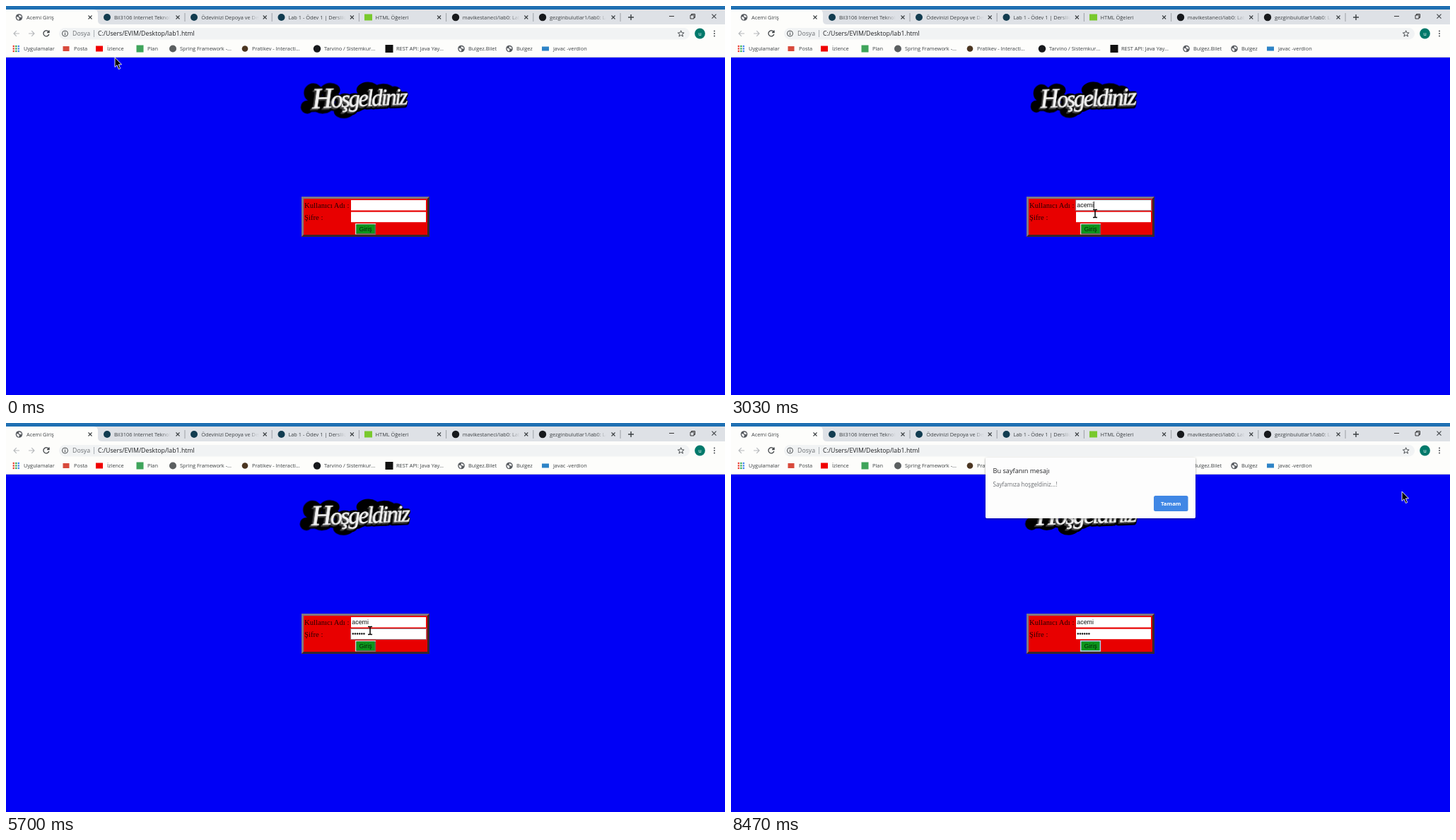
Recreate the animation shown at these times as an HTML page. Size 1017 px wide and 551 px high, loop 8500 ms.

```html
<!DOCTYPE html>
<html lang="tr">
<head>
<meta charset="utf-8">
<title>Giriş</title>
<style>
html, body { margin: 0; width: 100%; height: 100%; overflow: hidden; background: #0000f6; }
svg { display: block; }
body > svg, #wordart { position: absolute; left: 0; top: 0; }
#wordart { left: 411px; top: 96px; perspective: 600px; }
text { font-family: "Open Sans", sans-serif; font-size: 7.4px; fill: #3c4043; white-space: pre; }
.serif { font: 10.67px "Liberation Serif", serif; fill: #280000; }
.field { font: 8.9px "Liberation Sans", sans-serif; fill: #111; }
.art text { font: italic 34px "Liberation Serif", serif; letter-spacing: -2.4px; fill: inherit; }
.line { fill: none; stroke: #3c4043; stroke-width: 1.1; }
</style>
</head>
<body>
<svg id="page" width="1017" height="551"></svg>
<div id="wordart"></div>
<svg id="overlay" width="1017" height="551"></svg>
<script>
const LOOP = 8500;
const $ = id => document.getElementById(id);

const rect = (x, y, w, h, fill, more = '') =>
  `<rect x="${x}" y="${y}" width="${w}" height="${h}" fill="${fill}" ${more}/>`;
const dot = (x, y, r, fill) => `<circle cx="${x}" cy="${y}" r="${r}" fill="${fill}"/>`;
const label = (x, y, s, more = '') => `<text x="${x}" y="${y}" ${more}>${s}</text>`;
const line = (d, more = '') => `<path class="line" d="${d}" ${more}/>`;
const cross = (x, y, r) => line(`M${x - r} ${y - r}l${2 * r} ${2 * r}m0 ${-2 * r}l${-2 * r} ${2 * r}`);
const square = (x, y, fill, w = 10, h = w) => rect(x - w / 2, y - h / 2, w, h, fill);
const globe = (x, y) => dot(x, y, 4.8, '#55595e') +
  `<path d="M${x - 3.6} ${y - 1}l3 .8 1.2 2-1.4 2.2-2.2-2zM${x} ${y - 3.6}l3 1.4.6 2.4-2.4-.2-1.8-1.6z" fill="#f4f4f4"/>`;

function tab(x, title, icon, bg, end = 80) {
  return icon + `<svg x="${x}" y="5" width="${end}" height="21">${label(0, 14, title)}</svg>` +
    rect(x + end - 14, 8, 14, 16, `url(#fade)`, bg === 'active' ? 'opacity="0"' : '') +
    cross(x + 90, 16, 2.5);
}

function bookmarks() {
  const y = 60.5;
  const colors = ['#ea4335', '#36a853', '#4285f4', '#fbbc05'];
  let apps = '';
  for (let i = 0; i < 9; i++)
    apps += square(10.8 + i % 3 * 3.5, 57 + Math.floor(i / 3) * 3.5, colors[(i + Math.floor(i / 3)) % 4], 2.3);
  return apps + [
    [25, 'Uygulamalar', ''],
    [96, 'Posta', square(85, y, '#d84a3c', 9, 7)],
    [143, 'İzlence', square(132, y, '#f00000', 10, 8)],
    [200, 'Plan', square(189.5, y, '#3fa45b', 10)],
    [246, 'Spring Framework -...', dot(236, y, 5, '#5b5f60')],
    [348, 'Pratikev - Interacti...', dot(338, y, 4.3, '#4a3520')],
    [450, 'Tarvino / Sistemkur...', dot(440, y, 5.2, '#17191c')],
    [552, 'REST API: Java Yay...', square(542, y, '#111', 11)],
    [654, 'Bulgez.Bilet', globe(644, y)],
    [722, 'Bulgez', globe(712, y)],
    [774, 'javac -verdion', square(763, y, '#2d83c6', 10, 6)]
  ].map(([x, s, icon]) => icon + label(x, 63, s)).join('');
}

function browser() {
  const navy = '#123c50', ink = '#17191c';
  const tabs = [
    ['Bil3106 Internet Teknolojileri', dot(143, 16, 5, navy)],
    ['Ödevinizi Depoya ve Derslik', dot(266, 16, 5, navy)],
    ['Lab 1 - Ödev 1 | Derslikte', dot(389.5, 16, 5, navy)],
    ['HTML Öğeleri', square(512.5, 16, '#79c92d', 11, 9)],
    ['mavikestaneci/lab0: Lab çalışması', dot(636, 16, 5.2, ink)],
    ['gezginbulutlar1/lab0: Lab çalışması', dot(759, 16, 5.2, ink)]
  ];
  let s = `<defs><linearGradient id="fade"><stop stop-color="#dee1e6" stop-opacity="0"/>
    <stop offset="1" stop-color="#dee1e6"/></linearGradient></defs>`;
  s += rect(0, 0, 1017, 5.5, '#1f70b3') + rect(0, 5, 1017, 22, '#dee1e6') +
    rect(0, 26, 1017, 47, '#fdfdfb') +
    '<path d="M0 5H124Q130 5 130 11V21Q130 26 136 26H0Z" fill="#fdfdfb"/>';
  s += tab(29, 'Acemi Giriş', globe(18.5, 16), 'active');
  tabs.forEach(([title, icon], i) => {
    const x = 153 + i * 123.2;
    s += tab(x, title, icon) + line(`M${x + 100} 10v12`, 'style="stroke:#8d9196;stroke-width:.8"');
  });
  s += line('M880 16h8m-4-4v8', 'style="stroke-width:1.4"') +
    line('M938 14.5h7M968 13h5v5h-5zM969.5 13v-1.5h5v5H973', 'style="stroke:#222;stroke-width:.9"') +
    cross(1001.5, 14.7, 3);
  s += line('M19 39h-8m3.8-3.8L11 39l3.8 3.8M32 39h8m-3.8-3.8L40 39l-3.8 3.8', 'style="stroke:#b5b8bb"') +
    line('M60.5 37a4 4 0 1 0 .3 3M61 34.5v3h-3', 'style="stroke-width:1.3"');
  s += rect(75, 31, 892, 16.5, '#f1f3f4', 'rx="8.2"') +
    '<circle class="line" cx="83.5" cy="39" r="4" style="stroke-width:.9"/>' + line('M83.5 38.4v2.8M83.5 36.4v1') +
    label(94, 42.3, 'Dosya', 'style="font-size:8.75px;fill:#6b6f73"') +
    line('M124.5 34v10', 'style="stroke:#9aa0a6;stroke-width:.8"') +
    label(130, 42.3, 'C:/Users/EVIM/Desktop/lab1.html', 'style="font-size:8.75px;fill:#202124"') +
    line('M954.7 34.8l1.2 3 3.2.2-2.5 2 .9 3.1-2.8-1.8-2.8 1.8.9-3.1-2.5-2 3.2-.2z', 'style="stroke-width:.9"') +
    dot(981.5, 39, 7.4, '#00796b') +
    label(981.5, 41.5, 'u', 'text-anchor="middle" style="fill:#fff"') +
    [35.4, 39, 42.6].map(y => dot(1002, y, 1, '#4b4f53')).join('');
  return s + bookmarks() + rect(0, 72, 1017, 1, '#d5d7db');
}

function form() {
  return rect(418, 270, 181, 57, '#e80000') +
    '<path d="M418 327V270H599L596 273H421V324Z" fill="#81787f"/>' +
    '<path d="M599 270V327H418L421 324H596V273Z" fill="#36282d"/>' +
    label(422, 285.5, 'Kullanıcı Adı :', 'class="serif"') +
    label(422, 302.5, 'Şifre :', 'class="serif"') +
    rect(488, 275, 106, 14.5, '#fff') + rect(488, 291.7, 106, 14.5, '#fff') +
    '<rect id="ring" x="487.7" width="107" height="15" fill="none" stroke="#8a8f9c" stroke-width=".8"/>' +
    '<text id="user" class="field" x="489.3" y="285"/><g id="pass"></g>' +
    '<path id="caret" stroke="#000" stroke-width=".9"/>' +
    rect(494, 308, 29, 15.5, '#d9dfd9') + rect(495.3, 309.3, 27.7, 14.2, '#5c6a5c') +
    rect(495.5, 309.5, 26, 12.5, '#0c961c') +
    '<rect id="buttonRing" x="494.6" y="308.6" width="27.8" height="14.3" fill="none" stroke="#a9dcf5" stroke-width="1.3"/>' +
    label(508.5, 318.8, 'Giriş', 'class="field" text-anchor="middle" style="fill:#06240a"');
}

function wordart() {
  const word = '<tspan font-size="40">H</tspan>oşgeldiniz';
  const copy = (dx, dy, style) => `<text x="${21 + dx}" y="${46 + dy}" style="${style}">${word}</text>`;
  const puffs = [[14, 44, 9, 9], [23, 25, 13, 13], [47, 22, 14, 10], [36, 45, 14, 9], [66, 52, 15, 10],
    [82, 44, 16, 10], [102, 23, 17, 11], [125, 24, 17, 9], [143, 33, 12, 14], [115, 42, 20, 8]];
  let s = puffs.map(([x, y, rx, ry]) => `<ellipse cx="${x}" cy="${y}" rx="${rx}" ry="${ry}"/>`).join('');
  s += copy(-3, 1, 'stroke:#000;stroke-width:8;stroke-linejoin:round');
  for (let i = 4; i > 0; i--) {
    const shade = 165 - i * 22;
    s += copy(-i * .7, i * .6, `fill:rgb(${shade},${shade},${shade});stroke:#333;stroke-width:.6`);
  }
  s += copy(0, 0, 'fill:#f2f2f2;stroke:#e4e4e4;stroke-width:.7');
  return `<svg id="sign" class="art" width="180" height="70" overflow="visible"><g transform="rotate(-2 90 35)">${s}</g></svg>`;
}

function overlay() {
  return '<defs><filter id="shadow" x="-10%" y="-20%" width="120%" height="150%">' +
    '<feDropShadow dx="0" dy="1" stdDeviation="1.5" flood-opacity=".4"/></filter></defs>' +
    '<g id="alert">' + rect(360, 49, 297, 86, '#fdfdfd', 'rx="2" filter="url(#shadow)"') +
    label(370.5, 71, 'Bu sayfanın mesajı', 'style="font-size:9.2px;fill:#202124"') +
    label(370.5, 89.5, 'Sayfamıza hoşgeldiniz...!', 'style="font-size:8.05px;fill:#6a6d71"') +
    rect(598, 103, 48.5, 22, '#4087e5', 'rx="2.5"') +
    label(622.2, 116.8, 'Tamam', 'text-anchor="middle" style="font-size:7.8px;font-weight:700;fill:#fff"') + '</g>' +
    '<path id="arrow" d="M0 0V13.5L3 10.7 5.4 16.5 7.7 15.5 5.3 9.9H9.5Z" fill="#000" stroke="#fff" stroke-width=".9"/>' +
    '<path id="beam" d="M-3-5.5H-.8L0-5 .8-5.5H3M0-5V5M-3 5.5H-.8L0 5 .8 5.5H3" fill="none" stroke="#000" stroke-width="1.5"/>';
}

$('page').innerHTML = browser() + form();
$('wordart').innerHTML = wordart();
$('overlay').innerHTML = overlay();

// Timeline in ms
const USER = 'acemi';
const userKeys = [2080, 2230, 2380, 2520, 2660];
const passKeys = [3900, 4150, 4400, 4650, 4900, 5150];
const FOCUS_USER = 1300, FOCUS_PASS = 3600, CLICK = 7050, ALERT = 7200;
const pointer = [[0, 154, 73], [60, 154, 73], [780, 515, 295], [950, 515, 295], [1200, 514, 283],
  [1400, 514, 283], [1650, 515, 294], [5850, 515, 294], [6250, 505, 316], [7500, 505, 316],
  [8300, 949, 97], [LOOP, 949, 97]];

function pointerAt(t) {
  const i = pointer.findIndex(p => p[0] > t);
  const [t0, x0, y0] = pointer[i - 1], [t1, x1, y1] = pointer[i];
  const p = (t - t0) / (t1 - t0), e = p * p * (3 - 2 * p);
  return [x0 + (x1 - x0) * e, y0 + (y1 - y0) * e];
}

const show = (id, on) => $(id).setAttribute('visibility', on ? 'visible' : 'hidden');

function draw(t) {
  const angle = 18 * Math.cos(2 * Math.PI * t / 2000);
  $('sign').style.transform = `rotateY(${angle}deg)`;

  const typed = userKeys.filter(k => k <= t).length;
  const dots = passKeys.filter(k => k <= t).length;
  $('user').textContent = USER.slice(0, typed);
  $('pass').innerHTML = Array.from({ length: dots }, (_, i) => dot(490.8 + i * 3.12, 298.6, 1.25, '#111')).join('');

  const inPass = t >= FOCUS_PASS;
  const focused = t >= FOCUS_USER && t < CLICK;
  const lastEvent = Math.max(...[FOCUS_USER, FOCUS_PASS, ...userKeys, ...passKeys].filter(k => k <= t));
  const caretX = inPass ? 489.4 + dots * 3.12 : 489.6 + (typed ? $('user').getComputedTextLength() : 0);
  $('caret').setAttribute('d', `M${caretX} ${inPass ? 293.5 : 276.8}v10.5`);
  show('caret', focused && (t - lastEvent) % 1060 < 530);
  $('ring').setAttribute('y', inPass ? 291.4 : 274.7);
  show('ring', focused);
  show('buttonRing', t >= CLICK);
  show('alert', t >= ALERT);

  const [x, y] = pointerAt(t);
  const overField = x > 488 && x < 594 && y > 275 && y < 306;
  for (const id of ['arrow', 'beam']) $(id).setAttribute('transform', `translate(${x} ${y})`);
  show('arrow', !overField);
  show('beam', overField);
}

const start = performance.now();
function tick() {
  draw((performance.now() - start) % LOOP);
  requestAnimationFrame(tick);
}
tick();
</script>
</body>
</html>
```
